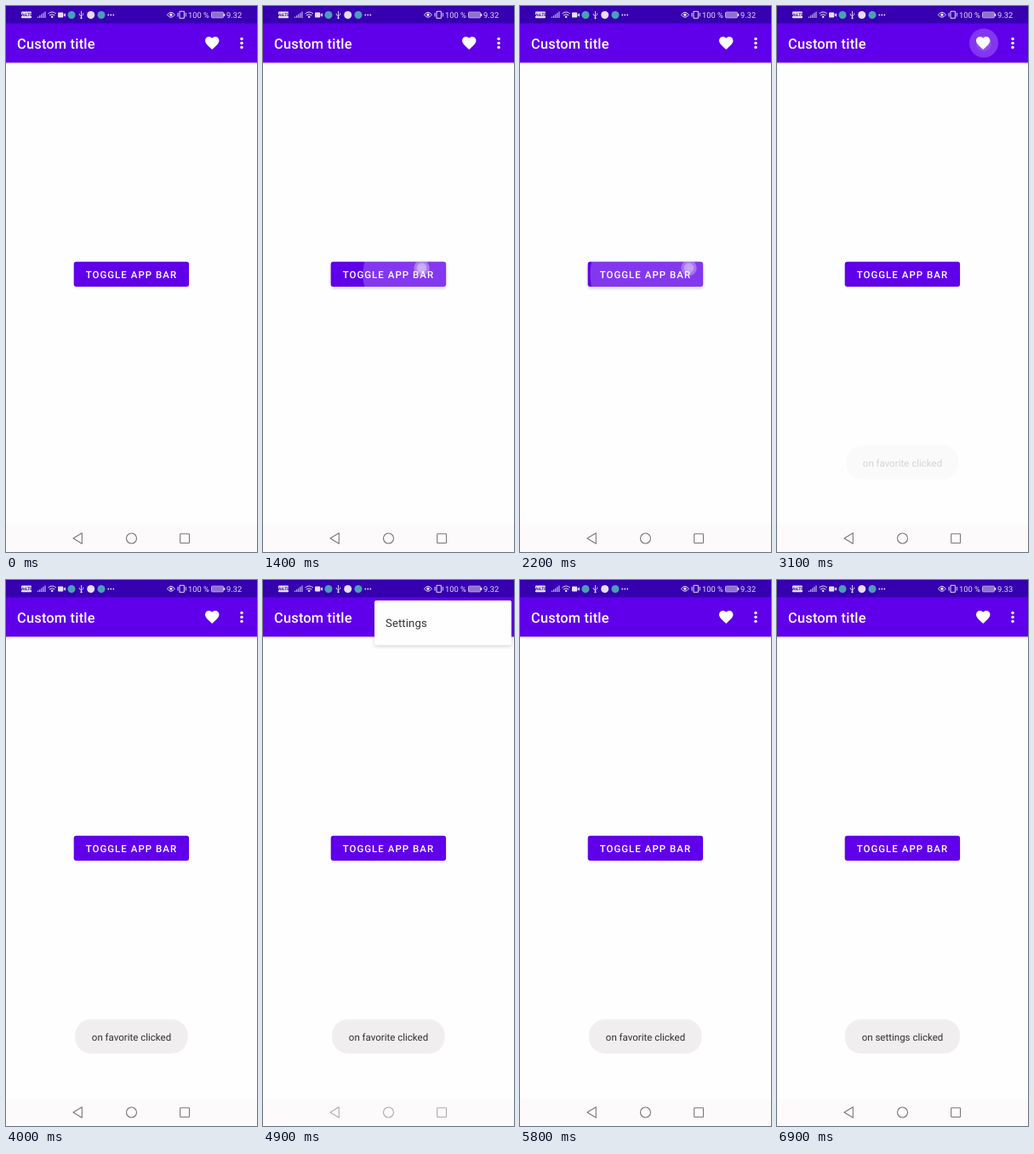
An HTML page for the animation above (7000 ms loop, 295x640 px).

```html
<!DOCTYPE html>
<html lang="en">
<head>
<meta charset="utf-8">
<title>Toggle app bar</title>
<style>
  html, body { margin: 0; width: 100%; height: 100%; overflow: hidden; background: #fefefe; }
  svg { display: block; width: 100%; height: 100%; font-family: Roboto, sans-serif; text-rendering: geometricPrecision; }
  .medium { font-weight: 500; fill: #fff; }
  .status { font-size: 9.3px; fill: #e6dff5; }
</style>
</head>
<body>
<svg viewBox="0 0 295 640">
  <defs>
    <filter id="blur" x="-20%" y="-50%" width="140%" height="200%"><feGaussianBlur stdDeviation="2"/></filter>
    <linearGradient id="edge" x2="0" y2="1">
      <stop stop-color="#000" stop-opacity=".14"/><stop offset="1" stop-color="#000" stop-opacity="0"/>
    </linearGradient>
    <radialGradient id="spot">
      <stop stop-color="#fff" stop-opacity=".62"/>
      <stop offset=".55" stop-color="#fff" stop-opacity=".56"/>
      <stop offset=".72" stop-color="#eee8f6" stop-opacity=".36"/>
      <stop offset="1" stop-color="#e4dcf0" stop-opacity=".4"/>
    </radialGradient>
    <clipPath id="buttonClip"><rect x="79.7" y="299.7" width="135.4" height="29.3" rx="3"/></clipPath>
    <clipPath id="menuClip"><rect id="menuReveal" x="126" y="20" width="169" height="64"/></clipPath>
  </defs>

  <rect width="295" height="640" fill="#fefefe"/>

  <g id="bar">
    <rect y="66" width="295" height="3" fill="url(#edge)"/>
    <rect y="20" width="295" height="46.4" fill="#6000ea"/>
    <text class="medium" x="13" y="50" font-size="16.4" letter-spacing=".2">Custom title</text>
    <circle id="iconRipple" cy="43.5" fill="#fff"/>
    <path transform="translate(232.4 33.6) scale(.82)" fill="#fff" d="M12 21.35l-1.45-1.32C5.4 15.36 2 12.28 2 8.5 2 5.42 4.42 3 7.5 3c1.74 0 3.41.81 4.5 2.09C13.09 3.81 14.76 3 16.5 3 19.58 3 22 5.42 22 8.5c0 3.78-3.4 6.86-8.55 11.54z"/>
    <g fill="#fff">
      <circle cx="277" cy="38.6" r="1.75"/><circle cx="277" cy="43.5" r="1.75"/><circle cx="277" cy="48.4" r="1.75"/>
    </g>
  </g>

  <rect width="295" height="20.4" fill="#3600b0"/>
  <g fill="#e6dff5">
    <rect x="18" y="6.5" width="12" height="7.8" rx="1"/>
    <text x="24" y="12.3" font-size="5" font-weight="700" fill="#3600b0" text-anchor="middle">VoLTE</text>
    <path d="M37 14v-1.5h1.2V14zM39.1 14v-3h1.2v3zM41.2 14V9.6h1.2V14zM43.3 14V8h1.2v6zM45.4 14V6.4h1.2V14z" opacity=".8"/>
    <g fill="none" stroke="#e6dff5">
      <path d="M49.5 9q4.7-4 9.4 0M51 11q3.2-2.7 6.4 0"/>
      <path d="M88.5 6v9M86.3 9v1.5l2.2 1.6 2.2-2V8.5" stroke-width=".9"/>
      <path d="M189.5 10.3q4.4-6 8.8 0q-4.4 6-8.8 0z"/>
      <path d="M204 6.3h5.4v8H204zM202 8v4.5M211.3 8v4.5"/>
      <rect x="241.5" y="7.2" width="14" height="6.6" rx="1" stroke-opacity=".8"/>
    </g>
    <circle cx="54.2" cy="12.8" r="1.3"/>
    <rect x="61" y="7.5" width="6.3" height="6" rx="1"/>
    <path d="M67.3 10.5l2.7-2.3v4.6z"/>
    <circle cx="88.5" cy="14.2" r="1.1"/>
    <circle cx="99.7" cy="10.5" r="4.5"/>
    <circle cx="120.3" cy="10.5" r=".9"/><circle cx="123.3" cy="10.5" r=".9"/><circle cx="126.3" cy="10.5" r=".9"/>
    <circle cx="193.9" cy="10.3" r="1.7"/>
    <rect x="242" y="7.7" width="13" height="5.6" opacity=".5"/>
    <rect x="256" y="9" width="1.3" height="3"/>
  </g>
  <g fill="#4a9fb8"><circle cx="77" cy="10.5" r="4.5"/><circle cx="112" cy="10.5" r="4.5"/></g>
  <text class="status" x="214" y="13.7">100 %</text>
  <text class="status" id="clock" x="259" y="13.7"></text>

  <rect id="lift" x="80" y="302" width="135" height="28.5" rx="3" filter="url(#blur)"/>
  <rect x="79.7" y="299.7" width="135.4" height="29.3" rx="3" fill="#6000ea"/>
  <g clip-path="url(#buttonClip)"><circle id="ripple" cy="314.5" fill="#fff"/></g>
  <text class="medium" x="93.7" y="318.5" font-size="11.47" letter-spacing="1.02">TOGGLE APP BAR</text>

  <g id="toast">
    <rect id="toastBox" y="515" height="40" rx="18.5" fill="#f0eeef"/>
    <text id="toastText" x="147.5" y="539.6" font-size="11.5" fill="#303030" text-anchor="middle"></text>
  </g>

  <g id="menu" clip-path="url(#menuClip)">
    <rect x="131" y="27" width="161" height="51" rx="2" opacity=".17" filter="url(#blur)"/>
    <rect x="131" y="24" width="161" height="52.5" rx="2" fill="#fefefe"/>
    <rect id="itemRipple" x="133" y="30.5" width="157" height="39.5" rx="1"/>
    <text x="144" y="55.4" font-size="13.1" letter-spacing=".12" fill="#333">Settings</text>
  </g>

  <rect y="608" width="295" height="32" fill="#fdfafb"/>
  <g id="nav" fill="none" stroke="#777" stroke-width="1.1">
    <path d="M89.3 617.8v12.4L79 624z" stroke-linejoin="round"/>
    <circle cx="147.5" cy="624" r="6"/>
    <rect x="204.7" y="618.7" width="10.8" height="10.8" rx=".6"/>
  </g>

  <circle id="touch" r="9.2" fill="url(#spot)"/>
</svg>
<script>
  const LOOP = 7000, TICK = 100, SPOT_FADE = 200, GROW = 225;
  const TAPS = [
    { x: 186.5, y: 307, down: 1345, up: 1450 },
    { x: 198.5, y: 307, down: 2025, up: 2180 },
    { x: 243, y: 44, down: 2860, up: 2960 },
    { x: 277, y: 44, down: 4360, up: 4460 },
    { x: 180, y: 57, down: 5330, up: 5440 }
  ];
  const el = {};
  document.querySelectorAll("[id]").forEach(n => el[n.id] = n);

  const ramp = (t, a, b) => Math.min(1, Math.max(0, (t - a) / (b - a)));
  const easeOut = p => 1 - (1 - p) ** 2;
  const mix = (a, b, p) => a + (b - a) * p;
  const set = (node, attrs) => {
    for (const k in attrs) node.setAttribute(k, attrs[k]);
  };
  const lastTap = (t, list) => list.filter(tap => tap.down <= t).pop();

  // Ripple grows from the finger towards the centre, then fades.
  function ripple(node, t, taps, centre, r0, r1, strength) {
    const tap = lastTap(t, taps);
    if (!tap) return set(node, { opacity: 0 });
    const p = easeOut(ramp(t, tap.down, tap.down + GROW));
    const fade = 1 - ramp(t, tap.down + GROW, tap.down + GROW + 350);
    set(node, { cx: mix(tap.x, centre(tap), p), r: mix(r0, r1, p), opacity: strength * fade });
  }

  function drawTouch(t) {
    const tap = lastTap(t, TAPS);
    if (!tap) return set(el.touch, { opacity: 0 });
    set(el.touch, { cx: tap.x, cy: tap.y, opacity: 1 - ramp(t, tap.up, tap.up + SPOT_FADE) });
  }

  function drawButton(t) {
    const taps = TAPS.slice(0, 2);
    ripple(el.ripple, t, taps, () => 147.5, 40, 69, .22);
    const tap = lastTap(t, taps);
    const lift = tap ? ramp(t, tap.down, tap.down + 60) * (1 - ramp(t, tap.up + 80, tap.up + 300)) : 0;
    set(el.lift, { opacity: .02 + .2 * lift });
  }

  // The navigation icons dim while the menu is open.
  function drawMenu(t) {
    const open = easeOut(ramp(t, 4540, 4860));
    const alpha = ramp(t, 4540, 4700) * (1 - ramp(t, 5500, 5790));
    set(el.menu, { opacity: alpha });
    set(el.menuReveal, { height: mix(14, 64, open), x: mix(230, 126, open) });
    set(el.itemRipple, { opacity: .18 * ramp(t, 5330, 5480) });
    set(el.nav, { opacity: 1 - .4 * alpha });
  }

  function drawToast(t) {
    const second = t >= 6790;
    const width = second ? 135 : 132.5;
    const alpha = second
      ? ramp(t, 6790, 6890)
      : ramp(t, 3050, 3300) * (1 - ramp(t, 6650, 6790));
    set(el.toast, { opacity: alpha });
    set(el.toastBox, { x: 147.4 - width / 2, width });
    el.toastText.textContent = `on ${second ? "settings" : "favorite"} clicked`;
  }

  function draw(t) {
    set(el.bar, { visibility: t >= 1500 && t < 2200 ? "hidden" : "visible" });
    el.clock.textContent = t >= 6700 ? "9.33" : "9.32";
    ripple(el.iconRipple, t, TAPS.slice(2, 4), tap => tap.x, 8, 17, .22);
    drawButton(t);
    drawToast(t);
    drawMenu(t);
    drawTouch(t);
  }

  const start = performance.now();
  function loop() {
    const t = (performance.now() - start) % LOOP;
    draw(Math.floor(t / TICK) * TICK);
    requestAnimationFrame(loop);
  }
  loop();
</script>
</body>
</html>
```
